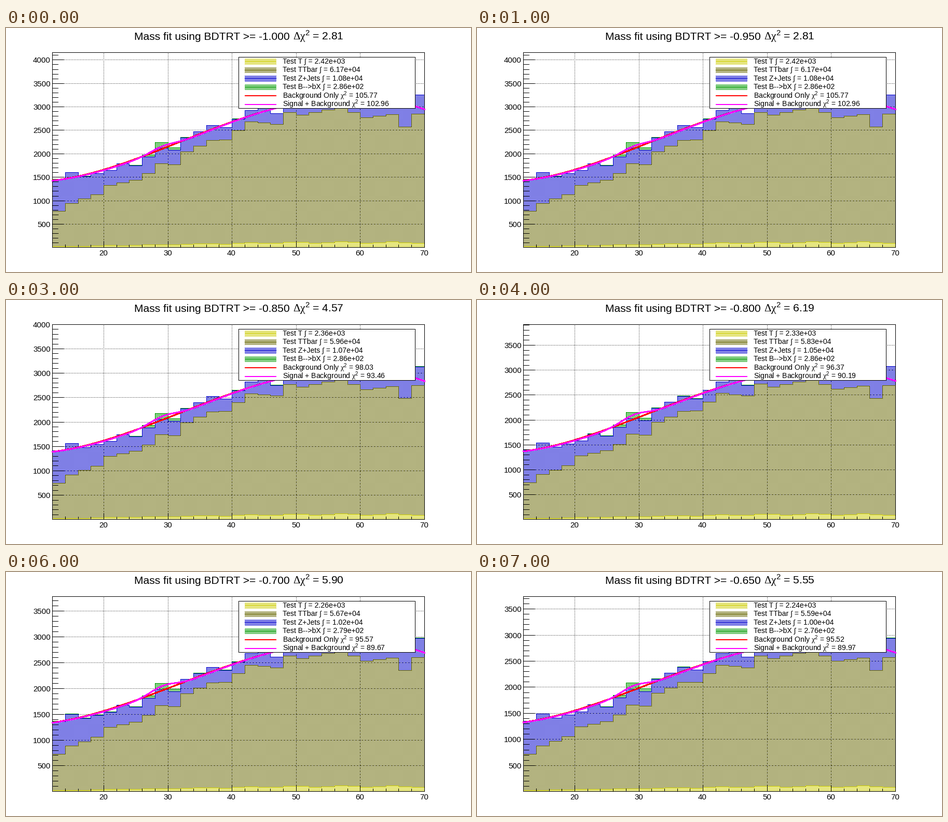
A matplotlib script that plays this animation: 896x472 px, repeating every 8000 ms.

```python
import numpy as np
import matplotlib as mpl
import matplotlib.pyplot as plt
from matplotlib.animation import FuncAnimation
from matplotlib.colors import to_rgb
from matplotlib.patches import Rectangle

W, H, DPI = 896, 472, 64
LEFT, RIGHT, TOP, BOTTOM = 0.1 * W, 0.9 * W, 0.1 * H, 0.9 * H
X_MIN, X_MAX, BIN = 12, 70, 2
FRAMES = 8

mpl.rcParams.update({
    "font.family": "Liberation Sans",
    "mathtext.fontset": "custom",
    "mathtext.rm": "Liberation Serif",
    "mathtext.sf": "Liberation Sans",
})

COLORS = {"T": "#cccc00", "TTbar": "#666600", "Z+Jets": "#0000cc", "B-->bX": "#009900"}
RED, MAGENTA = "#ff0000", "#ff00ff"

# y maximum, integrals in the order of COLORS, chi2 of both fits, delta chi2
SCAN = [
    (4162, (2420, 61700, 10800, 286), 105.77, 102.96, 2.81),
    (4141, (2410, 61400, 10800, 286), 106.76, 103.84, 2.92),
    (4001, (2360, 59600, 10700, 286), 98.03, 93.46, 4.57),
    (3918, (2330, 58300, 10500, 286), 96.37, 90.19, 6.19),
    (3832, (2280, 57500, 10400, 282), 95.62, 89.34, 6.27),
    (3786, (2260, 56700, 10200, 279), 95.57, 89.67, 5.90),
    (3742, (2240, 55900, 10000, 276), 95.52, 89.97, 5.55),
]

# Key points (bin or x, height) at the loosest cut
TT_KEYS = [(0, 770), (1, 940), (3, 1130), (4, 1330), (6, 1440), (7, 1575),
           (8, 1785), (9, 1770), (10, 2045), (12, 2285), (13, 2300), (15, 2680),
           (17, 2630), (18, 2880), (19, 2820), (22, 2985), (24, 2770),
           (26, 2835), (27, 2575), (28, 2850)]
Z_KEYS = [(0, 1450), (1, 1600), (2, 1515), (4, 1645), (5, 1790), (6, 1745),
          (8, 2115), (9, 2075), (10, 2340), (12, 2605), (13, 2555), (15, 2925),
          (16, 2995), (17, 2855), (18, 3120), (26, 3150), (27, 2965), (28, 3255)]
FIT_KEYS = [(12, 1430), (20, 1665), (30, 2150), (40, 2680), (47, 2985),
            (58, 3200), (70, 2950)]

LEGEND = (448, 56, 789, 156)
ROW = 16.52

fig = plt.figure(figsize=(W / DPI, H / DPI), dpi=DPI, facecolor="white")
ax = fig.add_axes([0, 0, 1, 1])


def pt(px):
    return px * 72 / DPI


def centre(v):
    """Middle of the pixel that holds v."""
    return np.floor(v) + 0.5


def to_x(x):
    return LEFT + (np.asarray(x) - X_MIN) * (RIGHT - LEFT) / (X_MAX - X_MIN)


def to_y(y, y_max):
    return BOTTOM - np.asarray(y) * (BOTTOM - TOP) / y_max


def gauss(x, mean, sigma):
    return np.exp(-0.5 * ((x - mean) / sigma) ** 2)


def grid_of(box):
    x0, y0, x1, y1 = box
    x, y = np.arange(x0, x1)[None, :], np.arange(y0, y1)[:, None]
    return x, y, np.ones((y.size, x.size, 3))


def stipple(pixels, mask, x, y, color):
    """Fill the mask with a checkerboard of the colour on white."""
    pixels[mask] = 1
    pixels[mask & ((x + y) % 2 == 0)] = to_rgb(color)


def paint(pixels, box, z):
    x0, y0, x1, y1 = box
    ax.imshow(pixels, extent=(x0, x1, y1, y0), interpolation="nearest",
              aspect="auto", zorder=z)


def line(xs, ys, color="black", width=1, z=3, **kw):
    ax.plot(xs, ys, color=color, lw=pt(width), zorder=z, snap=False,
            antialiased=False, **kw)


def frame(x0, y0, x1, y1, z):
    ax.add_patch(Rectangle((x0, y0), x1 - x0, y1 - y0, fill=False, ec="black",
                           lw=pt(1), zorder=z, snap=False, antialiased=False))


def label(x, y, s, size, z=5, ha="left"):
    ax.text(x, y, s, fontsize=pt(size), color="black", zorder=z, ha=ha, va="baseline")


def shrink(x, t):
    """Loss of events as the cut tightens from t = 0 to t = 1."""
    return 1 - t * (1 - np.interp(x, [12, 28, 44], [0.93, 0.93, 0.903]))


def stack(t):
    """Cumulative tops per layer, bottom first."""
    i = np.arange((X_MAX - X_MIN) // BIN)
    x = X_MIN + BIN * (i + 0.5)
    ramp = np.minimum(1, i / 18)
    t_top = 22 + ramp * (84 + 16 * np.cos(2 * np.pi * (i - 11) / 3.75))
    tt_top = np.interp(i, *zip(*TT_KEYS))
    z_top = np.interp(i, *zip(*Z_KEYS))
    tops = [v * shrink(x, t) for v in (t_top, tt_top, z_top)]
    return tops + [tops[-1] + 118 * gauss(x, 29.05, 1.5) + 4]


def draw_stack(t, y_max):
    box = (90, 48, 806, 424)
    x, y, pixels = grid_of(box)
    edges = centre(to_x(np.arange(X_MIN, X_MAX + 1, BIN)))
    layers = list(zip(stack(t), COLORS.values()))
    bins = np.clip(np.searchsorted(edges, x[0] + 0.5, side="right") - 1,
                   0, len(edges) - 2)
    for tops, color in reversed(layers):
        tops_y = centre(to_y(tops, y_max))
        stipple(pixels, y + 0.5 >= tops_y[bins][None, :], x, y, color)
        line(np.repeat(edges, 2)[1:-1], np.repeat(tops_y, 2), color, z=2)

    # dotted grid, one pixel in three
    for v in range(20, X_MAX, 10):
        column = int(to_x(v)) - box[0]
        pixels[(424 - y[:, 0]) % 3 == 0, column] = 0
    for v in range(500, y_max, 500):
        row = int(to_y(v, y_max)) - box[1]
        if row >= 0:
            pixels[row, (x[0] - 89) % 3 == 0] = 0
    paint(pixels, box, 0)


def draw_axes(y_max):
    left, right, top, bottom = map(centre, (LEFT, RIGHT, TOP, BOTTOM))
    frame(left, top, right, bottom, 3)
    for v in range(X_MIN, X_MAX + 1, 2):
        x = centre(to_x(v))
        major = v % 10 == 0
        line([x, x], [bottom, bottom - (11 if major else 5)])
        if major:
            label(x - 1, 440, str(v), 15, ha="center")
    for v in range(0, y_max + 1, 100):
        y = centre(to_y(v, y_max))
        major = v % 500 == 0
        line([left, left + (22 if major else 11)], [y, y])
        if major and v:
            label(86, y + 5.5, str(v), 15, ha="right")


def draw_fits(t, y_max, delta):
    x = np.linspace(X_MIN, X_MAX, 100)
    key_x, key_y = map(np.array, zip(*FIT_KEYS))
    background = np.polyval(np.polyfit(key_x, key_y * shrink(key_x, t), 4), x)
    bump = 44 * np.sqrt(delta) * gauss(x, 29.2, 2)
    signal = background + bump - 20 * gauss(x, 28, 8)
    for curve, color in ((background, RED), (signal, MAGENTA)):
        line(to_x(x), to_y(curve, y_max), color, 2, z=4)


def draw_legend(integrals, chi_bkg, chi_sig):
    x0, y0, x1, y1 = LEGEND
    x, y, pixels = grid_of(LEGEND)
    rows = y0 + 0.64 + ROW * (np.arange(6) + 0.5)
    for row, color in zip(rows, COLORS.values()):
        mask = (x >= 460) & (x < 521) & (abs(y + 0.5 - row) < 5.8)
        stipple(pixels, mask, x, y, color)
        line([460, 521], [centre(row)] * 2, color, z=8, solid_capstyle="butt")
    for row, color in zip(rows[4:], (RED, MAGENTA)):
        line([460, 521], [np.floor(row) + 1] * 2, color, 2, z=8, solid_capstyle="butt")
    paint(pixels, LEGEND, 6)
    frame(x0 + 0.5, y0 + 0.5, x1 - 0.5, y1 - 0.5, 7)

    for row, name, value in zip(rows, COLORS, integrals):
        label(533, row + 3, f"Test {name} \u222b = {value:.2e}", 14, z=8)
    chi = r"$\mathrm{\chi}^{\mathsf{2}}$"
    fits = (("Background Only", chi_bkg), ("Signal + Background", chi_sig))
    for row, (name, value) in zip(rows[4:], fits):
        label(533, row + 5, f"{name} {chi} = {value:.2f}", 14, z=8)


def draw(i):
    cut = -1 + 0.05 * i
    # the first step of the cut removes no events
    y_max, integrals, chi_bkg, chi_sig, delta = SCAN[max(i - 1, 0)]
    t = (SCAN[0][0] - y_max) / (SCAN[0][0] - SCAN[-1][0])
    ax.clear()
    draw_stack(t, y_max)
    draw_axes(y_max)
    draw_fits(t, y_max, delta)
    draw_legend(integrals, chi_bkg, chi_sig)
    label(247, 23, f"Mass fit using BDTRT >= {cut:.3f}", 21)
    label(553, 23, rf"$\mathrm{{\Delta\chi}}^{{\mathsf{{2}}}}$ = {delta:.2f}", 21)
    ax.set_xlim(0, W)
    ax.set_ylim(H, 0)
    ax.axis("off")
    return []


anim = FuncAnimation(fig, draw, frames=FRAMES, interval=1000,
                     init_func=lambda: draw(0), repeat=True, repeat_delay=0)
plt.show()
```
